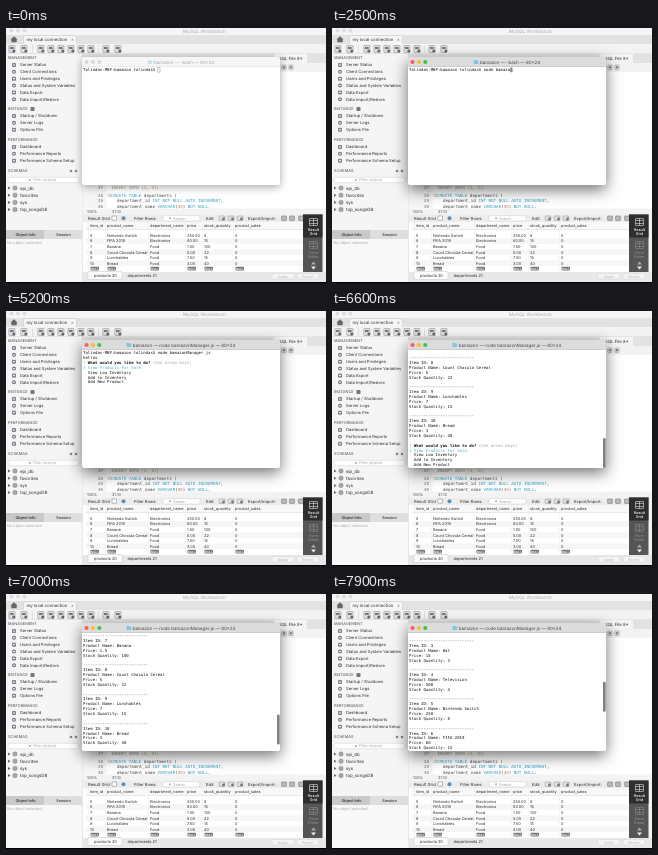
An HTML page with a canvas for the animation above (8 s loop, 320 by 255 pixels).

```html
<!DOCTYPE html>
<html lang="en">
<head>
<meta charset="utf-8">
<title>Database manager session</title>
<style>
  html, body { margin: 0; width: 100%; height: 100%; overflow: hidden; background: #f2f2f2; }
  canvas { display: block; width: 320px; height: 255px; }
</style>
</head>
<body>
<canvas id="stage"></canvas>
<script>
const LOOP = 8000;
const UI = 'Inter, "Liberation Sans", sans-serif';
const MONO = '"DejaVu Sans Mono", "Liberation Mono", monospace';
const canvas = document.getElementById('stage');
const ctx = canvas.getContext('2d');
const ratio = window.devicePixelRatio || 1;
canvas.width = 320 * ratio;
canvas.height = 255 * ratio;

function rect(x, y, w, h, color) {
  ctx.fillStyle = color;
  ctx.fillRect(x, y, w, h);
}

function round(x, y, w, h, r, color, stroke) {
  ctx.beginPath();
  ctx.roundRect(x, y, w, h, r);
  if (color) { ctx.fillStyle = color; ctx.fill(); }
  if (stroke) { ctx.strokeStyle = stroke; ctx.lineWidth = 0.5; ctx.stroke(); }
}

function dot(x, y, r, color) {
  ctx.beginPath();
  ctx.arc(x, y, r, 0, 7);
  ctx.fillStyle = color;
  ctx.fill();
}

function poly(points, color) {
  ctx.beginPath();
  points.forEach(([x, y]) => ctx.lineTo(x, y));
  ctx.fillStyle = color;
  ctx.fill();
}

// Vertically centred on y; laid out ten times larger so small advances stay fractional.
function text(str, x, y, size = 4.1, color = '#2a2a2a', { font = UI, weight = 400, align = 'left' } = {}) {
  ctx.save();
  ctx.translate(x, y + size * 0.35);
  ctx.scale(0.1, 0.1);
  ctx.font = `${weight} ${size * 10}px ${font}`;
  ctx.textRendering = 'geometricPrecision';
  ctx.textAlign = align;
  ctx.fillStyle = color;
  ctx.fillText(str, 0, 0);
  const width = ctx.measureText(str).width / 10;
  ctx.restore();
  return width;
}

// Runs of [string, color, weight] set one after the other.
function runs(parts, x, y, size, font = MONO) {
  for (const [str, color, weight] of parts) x += text(str, x, y, size, color, { font, weight });
}

function searchField(x, y, w, label, labelX) {
  round(x, y - 2.7, w, 5.4, 2, '#fff', '#cfcfcf');
  dot(labelX - 3, y, 1, '#aaa');
  text(label, labelX, y, 3.8, '#a5a5a5');
}

// ---------- Database window ----------
function toolbarIcons() {
  [6, 18, 35, 45, 55, 65, 75, 85, 100, 112].forEach((x, i) => {
    round(x - 3.2, 17.5, 6.2, 7, 0.6, '#dedede', '#888');
    rect(x - 2, 19, 3.6, 2, '#777');
    dot(x + 1.8, 23, 1.5, '#5d6870');
  });
  [26.5, 92.5].forEach(x => rect(x, 17.5, 0.5, 7.5, '#c8c8c8'));
}

function sidebar() {
  rect(0, 26, 76, 229, '#f5f5f5');
  const heading = (label, y) => text(label, 2, y, 3.9, '#666', { weight: 500 });
  const group = (labels, y) => labels.forEach((label, i) => {
    const cy = y + i * 6.85;
    if (i % 2) dot(8, cy, 2, '#6f787e');
    else round(6, cy - 2, 4, 4, 0.7, '#7d868c');
    rect(7, cy - 0.6, 2, 1.2, '#e6e9ea');
    text(label, 14, cy);
  });
  heading('MANAGEMENT', 30);
  group(['Server Status', 'Client Connections', 'Users and Privileges',
    'Status and System Variables', 'Data Export', 'Data Import/Restore'], 37);
  heading('INSTANCE', 81);
  round(24.5, 79, 4, 4, 0.7, '#777');
  group(['Startup / Shutdown', 'Server Logs', 'Options File'], 88);
  heading('PERFORMANCE', 112);
  group(['Dashboard', 'Performance Reports', 'Performance Schema Setup'], 119);
  heading('SCHEMAS', 143);
  dot(65, 143, 1.3, '#888');
  dot(70, 143, 1.3, '#888');
  searchField(2, 152, 71, 'Filter objects', 27);
  ['epi_db', 'favorites', 'sys', 'top_songsDB'].forEach((name, i) => {
    const y = 160 + i * 7.2;
    poly([[2, y - 1.5], [4.5, y], [2, y + 1.5]], '#666');
    round(7, y - 2, 4, 4, 1.4, '#a5aaad', '#777');
    text(name, 14, y, 4.4);
  });
  rect(0, 202, 76, 9, '#dedede');
  rect(0, 202, 38, 9, '#c9c9c9');
  text('Object Info', 19.5, 206.7, 3.8, '#333', { weight: 600, align: 'center' });
  text('Session', 57.5, 206.7, 3.8, '#444', { weight: 600, align: 'center' });
  rect(0, 211, 76, 44, '#f8f8f8');
  text('No object selected', 1, 214.5, 3.9, '#aaa');
  rect(76, 26, 0.6, 229, '#c4c4c4');
}

function editor() {
  rect(76.6, 26, 243.4, 9, '#e2e2e2');
  rect(268, 26, 33, 9, '#f4f4f4');
  text('SQL File 8*', 273, 30.5, 4.3);
  rect(76.6, 35, 243.4, 9, '#f3f3f3');
  [278, 285].forEach(x => {
    round(x - 2.2, 37, 4.4, 4.6, 0.8, '#e8e8e8', '#8a8a8a');
    dot(x, 39.3, 1.2, '#7b8286');
  });
  rect(76.6, 44, 243.4, 142, '#fff');
  rect(76.6, 44, 24, 136, '#f5f5f5');
  const word = '#444', key = '#3aa0c6';
  const code = [
    [105, [['INSERT INTO (', '#8a9a7a'], ['1', '#d28a45'], [', ', '#888'], ['2', '#d28a45'], [');', '#888']]],
    [105, [['CREATE TABLE', key], [' departments (', word]]],
    [111, [['department_id ', word], ['INT NOT NULL AUTO_INCREMENT', key], [',', word]]],
    [111, [['department_name ', word], ['VARCHAR', key], ['(', word], ['45', '#d2703a'], [') ', word], ['NOT NULL', key], [',', word]]]
  ];
  code.forEach(([x, parts], i) => {
    const y = 160 + i * 5.4 + (i ? 2 : 0);
    text(String(27 + i), 92, y, 4, '#666', { font: MONO });
    runs(parts, x, y, 4.2);
  });
  round(102, 166.2, 2.4, 2.4, 0, '#fff', '#999');
  rect(76.6, 180.5, 243.4, 6, '#f3f3f3');
  text('100%', 81, 183.6, 3.8, '#444');
  text('31:10', 106, 183.6, 3.8, '#444');
}

const columns = [
  ['item_id', 84], ['product_name', 101], ['department_name', 144],
  ['price', 181], ['stock_quantity', 198], ['product_sales', 229]
];
const gridRows = [
  ['5', 'Nintendo Switch', 'Electronics', '250.00', '8', '0'],
  ['6', 'FIFA 2019', 'Electronics', '60.00', '15', '0'],
  ['7', 'Banana', 'Food', '1.50', '100', '0'],
  ['8', 'Count Chocula Cereal', 'Food', '5.00', '22', '0'],
  ['9', 'Lunchables', 'Food', '7.00', '15', '0'],
  ['10', 'Bread', 'Food', '3.00', '40', '0']
];

function resultGrid() {
  rect(76.6, 186.5, 221, 68.5, '#fff');
  rect(76.6, 186.5, 221, 7.5, '#ececec');
  text('Result Grid', 82, 190.3, 4.2);
  round(106, 188, 4.5, 4.2, 0.4, '#fff', '#777');
  dot(117.5, 190.2, 2, '#5b8fb5');
  text('Filter Rows:', 128, 190.3, 4.1);
  searchField(157, 190.3, 37, 'Search', 167);
  text('Edit:', 200, 190.3, 4.1);
  [216, 225, 234].forEach(x => {
    round(x - 2.8, 188, 5.6, 4.4, 0.4, '#e4e4e4', '#888');
    dot(x + 1.5, 191, 1.4, '#777');
  });
  text('Export/Import:', 242, 190.3, 4.1);
  [278, 286, 295].forEach(x => round(x - 2.4, 188, 4.8, 4.4, 0.4, '#bbb', '#666'));

  rect(80, 194, 217, 7.5, '#f8f8f8');
  rect(80, 201.5, 217, 0.5, '#d5d5d5');
  columns.forEach(([label, x]) => {
    text(label, x, 198, 3.9);
    rect(x - 2, 194, 0.4, 49, '#e6e6e6');
    round(x + 0.5, 238.8, 8.5, 3.6, 0.8, '#777');
    text('NULL', x + 4.7, 240.6, 2.8, '#fff', { weight: 600, align: 'center' });
  });
  gridRows.forEach((row, i) => {
    const y = 207.5 + i * 5.55;
    if (i % 2) rect(80, y - 2.8, 217, 5.6, '#f6f6f7');
    row.forEach((cell, c) => text(cell, columns[c][1], y, 3.9));
  });

  rect(76.6, 244, 243.4, 11, '#e8e8e8');
  round(82, 243.5, 34, 8, 1, '#fcfcfc', '#c4c4c4');
  text('products 20', 88, 247.3, 4);
  text('departments 21', 121.5, 247.3, 4);
  [['Apply', 277], ['Revert', 302]].forEach(([label, x]) => {
    round(x - 11, 245.5, 22, 5.5, 1.2, '#f4f4f4', '#d0d0d0');
    text(label, x, 248.3, 3.8, '#b8b8b8', { align: 'center' });
  });
}

function resultPanel() {
  rect(297, 186.5, 23, 57.5, '#f3f3f3');
  rect(297, 186.5, 19.5, 57.5, '#555');
  rect(297, 186.5, 19.5, 23, '#2e2e2e');
  const tile = (y, color, lines) => {
    round(303.5, y - 3.5, 8, 7, 0.5, null, color);
    rect(303.5, y - 1.5, 8, 0.5, color);
    rect(303.5, y + 1, 8, 0.5, color);
    rect(307, y - 3.5, 0.5, 7, color);
    lines.forEach((line, i) => text(line, 307.5, y + 8 + i * 4.2, 3.7, color, { weight: 500, align: 'center' }));
  };
  tile(194, '#fff', ['Result', 'Grid']);
  tile(217, '#8e8e8e', ['Form', 'Editor']);
  poly([[305, 236.5], [307.5, 233.5], [310, 236.5]], '#aaa');
  poly([[305, 238.5], [307.5, 241.5], [310, 238.5]], '#eee');
}

function databaseWindow() {
  rect(0, 0, 320, 255, '#f5f5f5');
  [5.5, 12, 18.5].forEach(x => dot(x, 2.5, 2, '#dcdcdc'));
  text('MySQL Workbench', 198.5, 3, 4.7, '#aaa', { align: 'center' });
  rect(0, 7, 320, 9, '#e2e2e2');
  poly([[4.5, 11.5], [8, 8.2], [11.5, 11.5], [10.7, 11.5], [10.7, 14.3], [5.3, 14.3], [5.3, 11.5]], '#666');
  round(17.5, 7.5, 53, 9, [1.5, 1.5, 0, 0], '#f5f5f5', '#c4c4c4');
  text('my local connection', 20.5, 11.4, 4.3);
  text('×', 65, 11.4, 4.3, '#666');
  rect(0, 16, 320, 10, '#f3f3f3');
  rect(0, 25.6, 320, 0.5, '#cfcfcf');
  toolbarIcons();
  sidebar();
  editor();
  resultGrid();
  resultPanel();
  rect(0, 254, 320, 1, '#000');
}

// ---------- Terminal ----------
const PROMPT = 'Tolindas-MBP:bamazon tolindas$ ';
const COMMAND = 'node bamazonManager.js';
const INK = '#111', CYAN = '#45b5c4', FAINT = '#a0a0a0';
const CELL = 2.408, ROWS = 24;
const LEFT = 76, TOP = 29, WIDTH = 198, HEIGHT = 128;
const ENTER = 3200, MENU = 3800, LISTED = 6500, SCROLL = 6600;

const plain = str => [[str, INK]];
const menu = [
  [['? ', '#7fc08a'], ['What would you like to do? ', '#111', 700], ['(Use arrow keys)', FAINT]],
  [['❯ View Products For Sale', CYAN]],
  plain('  View Low Inventory'),
  plain('  Add to Inventory'),
  plain('  Add New Product')
];
const products = [
  ['Hat', 15, 3], ['Television', 500, 4], ['Nintendo Switch', 250, 8], ['FIFA 2019', 60, 15],
  ['Banana', 1.5, 100], ['Count Chocula Cereal', 5, 22], ['Lunchables', 7, 15], ['Bread', 3, 40]
];
const listing = products.flatMap(([name, price, stock], i) => [
  '-'.repeat(27), `Item ID: ${i + 3}`, `Product Name: ${name}`,
  `Price: ${price}`, `Stock Quantity: ${stock}`, ''
].map(plain)).concat(menu);

// [time, characters typed]
const typing = [[0, 0], [1600, 1], [1700, 2], [1900, 3], [2000, 4], [2100, 6], [2200, 7],
  [2300, 9], [2500, 11], [2600, 12], [2800, 13], [3000, 22]];
// [time, lines scrolled back], interpolated
const scrolling = [[SCROLL, 0], [7000, 5], [7200, 12], [7400, 19], [7600, 25], [7700, 25], [7900, 30]];

const typedAt = t => typing.findLast(([start]) => t >= start)[1];

function scrollAt(t) {
  const next = scrolling.findIndex(([time]) => t < time);
  if (next === 0) return 0;
  if (next < 0) return scrolling.at(-1)[1];
  const [t0, a] = scrolling[next - 1], [t1, b] = scrolling[next];
  return Math.round(a + (b - a) * (t - t0) / (t1 - t0));
}

function terminalLines(t, scroll) {
  if (t >= LISTED) {
    const first = listing.length - ROWS - scroll;
    return Array.from({ length: ROWS }, (_, row) => listing[first + row] || []);
  }
  const lines = [plain(PROMPT + COMMAND.slice(0, typedAt(t)))];
  return t >= MENU ? [...lines, plain('hellos'), ...menu] : lines;
}

function frame(active) {
  ctx.save();
  ctx.shadowColor = active ? 'rgba(0,0,0,.55)' : 'rgba(0,0,0,.35)';
  ctx.shadowBlur = (active ? 15 : 8) * ratio;
  ctx.shadowOffsetY = (active ? 5 : 2) * ratio;
  round(LEFT, TOP, WIDTH, HEIGHT, 2, '#fff');
  ctx.restore();
  round(LEFT, TOP, WIDTH, 10, [2, 2, 0, 0], active ? '#dcdcdc' : '#f6f6f6');
  rect(LEFT, 38.6, WIDTH, 0.4, active ? '#b5b5b5' : '#d5d5d5');
  const lights = active ? ['#f9605a', '#f8bd38', '#3cc648'] : Array(3).fill('#d9d9d9');
  lights.forEach((color, i) => dot(80.5 + i * 6.4, 34, 2.1, color));
}

function title(t, active) {
  const label = `bamazon — ${t >= ENTER ? COMMAND : '-bash'} — 80×24`;
  const center = LEFT + WIDTH / 2 + 3;
  const width = text(label, center, 34.2, 4.5, active ? '#444' : '#a5a5a5', { align: 'center' });
  const x = center - width / 2 - 6;
  round(x, 32, 2.2, 1.5, 0.4, active ? '#66b6dd' : '#b9d9e8');
  round(x, 32.6, 4.6, 3.4, 0.4, active ? '#7cc6e8' : '#c7e2ee');
}

function cursor(t, active) {
  if (t >= MENU) return;
  const entered = t >= ENTER;
  const x = 77 + (entered ? 0 : (PROMPT.length + typedAt(t)) * CELL);
  const y = entered ? 44.5 : 39.6;
  round(x, y, CELL, 4.6, 0, active ? '#8c8c8c' : null, active ? null : '#8c8c8c');
}

function terminal(t) {
  const active = t >= 1000;
  const scroll = scrollAt(t);
  frame(active);
  title(t, active);
  cursor(t, active);
  terminalLines(t, scroll).forEach((parts, row) => runs(parts, 77, 41.9 + row * 4.86, 4));
  if (t >= SCROLL) round(271, 127 - scroll * 1.31, 2.7, 30, 1.3, '#808080');
}

function draw(now) {
  const t = now % LOOP;
  ctx.setTransform(ratio, 0, 0, ratio, 0, 0);
  databaseWindow();
  terminal(t);
  requestAnimationFrame(draw);
}
requestAnimationFrame(draw);
</script>
</body>
</html>
```
